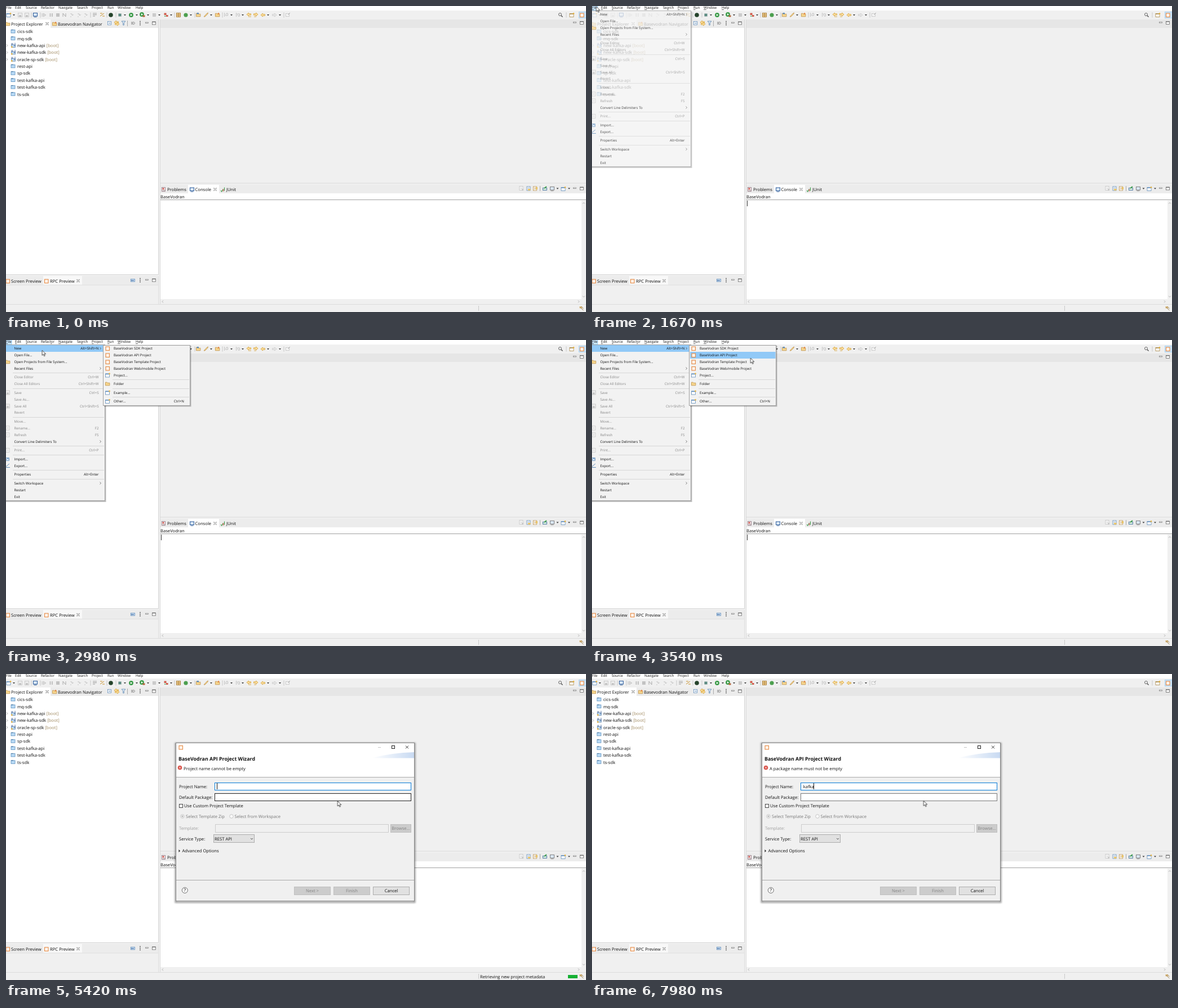
Animation, 1029 px wide and 544 px high, one loop 8000 ms. Source, as an HTML page:

```html
<!DOCTYPE html>
<html lang="en">
<head>
<meta charset="utf-8">
<title>Project wizard</title>
<style>
html, body { margin: 0; width: 100%; height: 100%; overflow: hidden; background: #f0f0f0; }
svg { display: block; width: 100vw; height: 100vh; }
text { font-family: "Open Sans", "Noto Sans", sans-serif; text-rendering: geometricPrecision; white-space: pre; }
.a { animation: 8s linear infinite; }
.s { animation: 8s step-end infinite; }
#pointer { animation-name: move; }
#arrow { animation-name: enter; }
#menu { animation-name: menu; }
#newRow { animation-name: newRow; }
#sub { animation-name: sub; }
#subRow { animation-name: subRow; }
#keys { animation-name: keys; }
#mark { animation-name: mark; }
#frame { animation-name: frame; }
#form { animation-name: form; }
#status { animation-name: status; }
#hover { animation-name: hover; }
#cover { animation-name: type; }
#caret { animation-name: blink; }
#errA { animation-name: errA; }
#errB { animation-name: errB; }

@keyframes enter { 0% { opacity: 0 } .875%, 100% { opacity: 1 } }
@keyframes move {
  0%, .875% { transform: translate(964px, 520px); animation-timing-function: ease-out }
  10%, 10.8% { transform: translate(20px, 2px) }
  13.875%, 24.5% { transform: translate(7.5px, .8px) }
  29.25%, 36.8% { transform: translate(38px, 15px) }
  41.125%, 42.5% { transform: translate(282px, 46px) }
  44.25% { transform: translate(281.3px, 32.3px) }
  45.375%, 48% { transform: translate(273px, 22px) }
  48.875%, 50% { transform: translate(281px, 28px) }
  50.75%, 57.5% { transform: translate(280.8px, 31px) }
  58.75%, 60% { transform: translate(283px, 39px); animation-timing-function: ease-in-out }
  67.4%, 70.75% { transform: translate(588.3px, 226px) }
  71.6%, 100% { transform: translate(588.2px, 225.4px) }
}
@keyframes menu {
  0%, 18% { opacity: 0 }
  21.75%, 50.75% { opacity: 1 }
  53%, 100% { opacity: 0 }
}
@keyframes keys { 0% { opacity: 0 } 18.75% { opacity: 1 } 51.8%, 100% { opacity: 0 } }
@keyframes newRow { 0% { opacity: 0 } 26.4%, 100% { opacity: 1 } }
@keyframes sub {
  0%, 31.5% { opacity: 0 }
  34.5%, 50.75% { opacity: 1 }
  53%, 100% { opacity: 0 }
}
@keyframes subRow {
  0% { opacity: 0; transform: none }
  39.25% { opacity: 1; transform: none }
  40.125% { opacity: 1; transform: translateY(12px) }
  41.125% { opacity: 1; transform: translateY(24px) }
  43.25% { opacity: 1; transform: translateY(12px) }
  44.25%, 100% { opacity: 1; transform: none }
}
@keyframes mark { 0% { opacity: 0 } 18.75% { opacity: 1 } 58.75%, 100% { opacity: 0 } }
@keyframes frame { 0%, 53% { opacity: 0 } 55.8%, 100% { opacity: 1 } }
@keyframes form { 0% { opacity: 0 } 60.625%, 100% { opacity: 1 } }
@keyframes status { 0% { opacity: 0 } 61.6% { opacity: 1 } 69.625%, 100% { opacity: 0 } }
@keyframes hover { 0% { stroke: #7a7a7a } 66% { stroke: #222 } 75.625%, 100% { stroke: #7a7a7a } }
@keyframes type {
  0% { transform: none }
  81.5% { transform: translateX(4px) }
  87.375% { transform: translateX(8px) }
  89.375% { transform: translateX(11px) }
  93.1% { transform: translateX(15px) }
  98.75%, 100% { transform: translateX(19px) }
}
@keyframes blink { 0% { opacity: 1 } 71.625% { opacity: 0 } 78.5%, 100% { opacity: 1 } }
@keyframes errA { 0% { opacity: 1 } 81.5%, 100% { opacity: 0 } }
@keyframes errB { 0% { opacity: 0 } 81.5%, 100% { opacity: 1 } }
</style>
</head>
<body>
<svg id="stage" viewBox="0 0 1029 544" preserveAspectRatio="none"></svg>
<script>
const BRAND = 'BaseVodran', UI = 7.65, SMALL = 6.15, ORANGE = '#e58a45', GREY = '#c2c2c2';

const rect = (x, y, w, h, fill, stroke, extra = '') =>
  `<rect x="${x}" y="${y}" width="${w}" height="${h}" fill="${fill}"${stroke ? ` stroke="${stroke}"` : ''} ${extra}/>`;
const path = (d, stroke, width = 1, fill = 'none') =>
  `<path d="${d}" stroke="${stroke}" stroke-width="${width}" fill="${fill}"/>`;
const disc = (x, y, r, fill, stroke = 'none') =>
  `<circle cx="${x}" cy="${y}" r="${r}" fill="${fill}" stroke="${stroke}" stroke-width=".8"/>`;
const text = (x, y, s, size = UI, fill = '#111', extra = '') =>
  `<text x="${x}" y="${y + size * .357}" font-size="${size}" fill="${fill}" ${extra}>${s}</text>`;
const group = (id, kind, body) => `<g id="${id}" class="${kind}">${body}</g>`;
const END = 'text-anchor="end"', MID = 'text-anchor="middle"', THIN = 'stroke-width=".8"';

// Small icons, placed by their centre
const square = (x, y) => rect(x - 3, y - 3, 6.5, 6.5, '#fdf3ea', ORANGE, 'stroke-width="1.1"');
const down = (x, y) => path(`M${x - 2} ${y - 1}h4l-2 2.2z`, 'none', 0, '#333');
const right = (x, y, c = '#555') => path(`M${x - 1} ${y - 2}l2 2l-2 2`, c, .8);
const cross = (x, y) => path(`M${x - 2.5} ${y - 2.5}l5 5m0-5l-5 5`, '#888', 1.6) + path(`M${x - 2} ${y - 2}l4 4m0-4l-4 4`, '#fff', .7);
const dots = (x, y) => `<path d="M${x} ${y - 4}v9" stroke="#999" stroke-dasharray="1 1.2"/>`;
const minMax = (x, y) => rect(x - 2.5, y - 1.5, 5, 1.6, '#fff', '#777', 'stroke-width=".7"') +
  rect(x + 9.5, y - 2.5, 6, 5, '#fff', '#666', THIN) + path(`M${x + 9.5} ${y - 2}h6`, '#666');
const kebab = (x, y) => [-3, 0, 3].map(d => disc(x, y + d, .9, '#555')).join('');
const folder = (x, y, c = '#f6d58c', e = '#bd914a') => path(`M${x - 3.6} ${y + 2.8}v-5.600h2.800l1 1.100h3.700v4.500z`, e, .8, c);
const win = (x, y, c = '#5f8cba') => rect(x - 4, y - 2.5, 7, 6, '#fff', c, THIN) +
  path(`M${x - 4} ${y - 2}h7`, c, 1.4) + disc(x + 3, y - 2.6, 1.3, '#e7b23c');
const disk = (x, y) => rect(x - 3.5, y - 3.5, 7, 7, '#eee', GREY, THIN) + rect(x - 1.8, y, 3.6, 3, GREY);
const page = (x, y, c = GREY) => rect(x - 3, y - 3.5, 6, 7, '#fafafa', c, THIN) + path(`M${x - 1.5} ${y - 1}h3m-3 2h3`, c, .7);
const screen = (x, y, c = '#39659f') => rect(x - 3.5, y - 3.5, 7, 5.5, '#dceafa', c, 'stroke-width="1.1"') + path(`M${x - 2.5} ${y + 3.6}h5`, c);
const play = (x, y) => disc(x, y, 3.9, '#3a9b48') + path(`M${x - 1.2} ${y - 2.1}l3.4 2.100l-3.400 2.100z`, 'none', 0, '#fff');
const arrow = (x, y, flip = 1, c = '#d49a22', f = '#ffe7b0') =>
  path(`M${x - 4 * flip} ${y}l${3.4 * flip}-2.800v1.600h${4 * flip}v2.400h${-4 * flip}v1.600z`, c, .8, f);
const step = (x, y) => path(`M${x - 3} ${y - 2}q3-2 4 2m-2-1l2 2l2-2M${x - 3} ${y + 3}h2`, GREY, .9);
const project = (x, y) => rect(x - 3.5, y - 2.5, 7, 5.5, '#b9daf5', '#5a8fbe', THIN) + path(`M${x - 3.5} ${y - 2.600}h4`, '#46749f', 1);
const bootProject = (x, y) => rect(x - 3.5, y - 1, 7, 4.5, '#c4dff5', '#5a7fa8', THIN) +
  path(`M${x - 3} ${y - 4}v3m2-3v3m4-3.400v4q0 1.600-2 1.300`, '#3a5c92', .9) + rect(x - 4, y + 1.6, 2.6, 2.6, '#e5b54a');

function toolbar() {
  const y = 16;
  const all = (f, ...xs) => xs.map(x => f(x, y)).join('');
  return win(5, y) + all(disk, 25, 37) + screen(52, y) +
    all(dots, 45, 61, 150, 179, 195, 299, 335, 384, 493, 994) +
    all(down, 14, 211, 232, 252, 272, 293, 328, 364, 400, 420, 465, 486) +
    path('M64 13v6M66 13l5 3l-5 3z', GREY, .9, '#ddd') +
    rect(77.5, 13, 2, 6, GREY) + rect(81, 13, 2, 6, GREY) + rect(89, 13, 6, 6, GREY) +
    path('M101 19v-6l5 6v-6', '#aaa', 1) + all(step, 117, 130, 142) +
    path('M154 13h7m-7 2.500h7m-7 2.500h4', '#888', .8) + path('M167 18l7-5m-7 0h4m0 5h4', '#c99128', 1) +
    disc(186, y, 3.8, '#25432b') +
    disc(202, y, 2.2, '#8fbcb3', '#2f6358') + path('M199 13.500l6 5m0-5l-6 5', '#2f6358', .6) +
    play(222, y) + play(241, y - 1) + rect(242.5, 16.5, 4, 3, '#b5623a') +
    rect(260.5, 13.5, 5, 5, '#ccc', GREY, THIN) +
    rect(280.5, 12.5, 4, 3.5, '#cf5a4a') + rect(284, 16, 3.5, 3, '#cf5a4a') + path('M281 18h2.500', '#3a9b48', 1.3) +
    rect(302.5, 12.5, 7, 7, '#efcf93', '#a0722a', THIN) + path('M306 12.500v7m-3.500-3.500h7', '#a0722a', .8) +
    disc(319, y, 3.6, '#4c9f4f') +
    folder(341, y) + rect(338.5, 12, 3.5, 2.5, '#5f8cba') + path('M351 19l5.500-6l2-1l-.8 2.500l-4.700 4.500z', '#bd914a', .8, '#f6d58c') +
    folder(375, y) + disc(377, 13.5, 1.5, ORANGE) +
    path('M387.500 12v7m2-2h4v-4h-2.500z', GREY, 1) + path('M408.500 12v7m2-5h4v4h-2.500z', GREY, 1) +
    arrow(431, 15) + arrow(443, 15, -1) + path('M430 19h5m5 0h4', '#d49a22', .8) +
    arrow(456, y) + arrow(476, y, -1, GREY, '#eee') +
    rect(496.5, 13.5, 6, 5, '#f7f7f7', GREY, THIN) + path('M500 16l4-4', '#999', .8) +
    disc(983, 15, 2.5, 'none', '#444') + path('M985 17l2.500 2.500', '#444', 1.2) +
    win(1004, y, '#a88746') + rect(1016.5, 10.5, 13, 11, '#cce4f7', '#a9d2f2') + square(1021.5, y);
}

function base() {
  const menus = { File: 0, Edit: 16, Source: 35, Refactor: 62, Navigate: 93, Search: 126, Project: 152, Run: 180, Window: 198, Help: 230 };
  const tree = ['cics-sdk', 'mq-sdk', '*new-kafka-api', '*new-kafka-sdk', '*oracle-sp-sdk', 'rest-api', 'sp-sdk', 'test-kafka-api', 'test-kafka-sdk', 'ts-sdk'];
  let out = rect(0, 0, 1029, 544, '#f0f0f0') + rect(0, 0, 1029, 8, '#fff') +
    group('keys', 's', rect(-1, -1, 11, 9, '#cce8ff', '#99d1ff') +
      path('M0 6.500h3M16 6.500h3M35 6.500h3M79 6.500h2.500M93 6.500h4.500M133 6.500h3M152 6.500h3.500M180 6.500h3.500M198 6.500h5M230 6.500h4', '#333', .7));
  for (const [s, x] of Object.entries(menus)) out += text(x, 3, s, SMALL);
  out += toolbar();

  // Explorer pane
  out += rect(0, 24, 271, 15, '#ececec') + rect(0, 24, 79, 15, '#fff') + rect(0, 39, 270, 438, '#fff') +
    path('M270.500 24v454M0 477.500h271', '#d5d5d5') +
    folder(3, 32) + text(9, 32, 'Project Explorer') + cross(73, 31.5) +
    folder(86, 32) + disc(88, 29.5, 1.5, ORANGE) + text(92, 32, 'Basevodran Navigator') +
    rect(180.5, 27.5, 6, 6, '#fff', '#5f8cba', THIN) + path('M182 30.500h3.500', '#5f8cba') +
    arrow(196, 29, 1) + arrow(197, 32, -1) + path('M205 27h7l-2.700 3v4h-1.600v-4z', '#5580ad', .8, '#e4effa') +
    path('M215.500 26v10', '#aaa') + rect(222, 28, 4, 5, '#b5b5b5') + path('M226 28l3 2.500l-3 2.500', '#888') +
    kebab(238, 30.5) + minMax(250, 30.5);
  tree.forEach((name, i) => {
    const y = 45.5 + 12.37 * i, boot = name[0] === '*';
    const label = boot ? `${name.slice(1)} <tspan fill="#a08a60">[boot]</tspan>` : name;
    out += (boot ? right(2, y, '#999') + bootProject(13, y - .3) : project(12.5, y - .5)) + text(20, y, label);
  });

  // Preview pane
  out += rect(0, 480, 271, 16, '#ececec') + rect(66, 480, 69, 16, '#f8f8f8') + path('M270.500 480v50M0 496h270', '#dedede') +
    square(3, 489) + text(9, 489, 'Screen Preview') + square(71.5, 489) + text(78, 489, 'RPC Preview') + cross(128, 488.5) +
    rect(221.5, 485.5, 7, 4.5, '#d5e7f7', '#5f8cba', THIN) + path('M222 488h5', '#39659f', 1.2) +
    kebab(238, 487.5) + minMax(250, 487.5);

  // Editor area and console
  out += rect(274, 24, 755, 15, '#e6e6e6') + path('M273.500 24v506M274 315h755', '#d9d9d9') + minMax(1009, 30) +
    rect(274, 318, 755, 15, '#ececec') + rect(323, 318, 55, 15, '#fff') + rect(274, 333, 755, 188, '#fff') +
    rect(276.5, 322.5, 6, 7, '#f6e6e6', '#8e7480', THIN) + disc(279, 325, 1.4, '#cc4b43') + path('M278 328h4', '#888', .8) +
    text(286, 326.5, 'Problems') + screen(330, 326.5) + text(335.5, 326.5, 'Console') + cross(371, 326) +
    path('M381 328l1.600 2l2.600-4.500M387.500 322.500v6', '#3a9b48', 1.1) + rect(384.5, 325.5, 2, 4, '#c8776a') + text(391, 326.5, 'JUnit') +
    page(914, 324) + path('M915 325l3 3m0-3l-3 3', '#aaa', .8) +
    page(927, 324.5, '#5f8cba') + rect(926, 325, 4.5, 3, '#e9c468') + page(938.5, 324.5, '#bd914a') + rect(940, 322, 3, 4, '#e9c468') +
    path('M947.500 320v9', '#aaa') + rect(952.5, 323.5, 7, 4, '#d3ecdb', '#39659f', THIN) + path('M955 324l4-3', '#3a9b48', 1.8) +
    screen(969, 325, '#888') + down(978.5, 324.5) + win(989, 325) + down(999, 324.5) + minMax(1009, 324.5) +
    text(274, 339.5, BRAND) + path('M274 344.500h755', '#a0a0a0') +
    rect(1021, 346, 8, 175, '#f0f0f0') + rect(274, 521, 755, 9, '#f0f0f0') +
    path('M1023 351.500l2-2l2 2M1023 515.500l2 2l2-2M279 523.500l-2 2l2 2M1015 523.500l2 2l-2 2', '#aaa', .9) +
    path('M0 530.500h1029', '#dcdcdc') + dots(838.5, 537.5) +
    rect(1017.5, 534, 4.5, 3.5, '#dfbd80') + path('M1018 535l6.500 6m-4-7l4 4', '#9a8050', 1) +
    group('mark', 's', path('M275.500 346v10', '#333')) +
    group('status', 's', text(841, 538, 'Retrieving new project metadata') + rect(997, 535, 17, 6, '#16b034'));
  return out;
}

function menuItems(list, x, end) {
  return list.map(([y, s, key = '', off]) => {
    const c = off ? '#858585' : '#111';
    return text(x, y, s, SMALL, c) + (key === '>' ? right(end + 3, y) : text(end, y, key, SMALL, c, END));
  }).join('');
}

function fileMenu() {
  const items = [
    [15, 'New', 'Alt+Shift+N'], [27, 'Open File...'], [39, 'Open Projects from File System...'], [50.5, 'Recent Files', '>'],
    [66, 'Close Editor', 'Ctrl+W', 1], [78, 'Close All Editors', 'Ctrl+Shift+W', 1],
    [93.5, 'Save', 'Ctrl+S', 1], [105.5, 'Save As...', '', 1], [117.5, 'Save All', 'Ctrl+Shift+S', 1], [129, 'Revert', '', 1],
    [144.5, 'Move...', '', 1], [156.5, 'Rename...', 'F2', 1], [168.5, 'Refresh', 'F5', 1], [180.5, 'Convert Line Delimiters To', '>'],
    [196, 'Print...', 'Ctrl+P', 1], [211.5, 'Import...'], [223.5, 'Export...'], [239, 'Properties', 'Alt+Enter'],
    [254.5, 'Switch Workspace', '>'], [266.5, 'Restart'], [278.5, 'Exit']];
  const lines = [58.5, 86.5, 137.5, 188.5, 204.5, 231.5, 247.5];
  return rect(-2, 10, 179.5, 278, '#000', '', 'opacity=".25"') + rect(-2, 8.5, 177.5, 277, '#f2f2f2', '#a0a0a0') +
    group('newRow', 's', rect(0, 9, 173, 12, '#91c9f7')) +
    path(lines.map(y => `M12 ${y}h162`).join(''), '#d7d7d7') + menuItems(items, 14.5, 164.5) + right(167.5, 15) +
    folder(3, 39) + disk(3, 93.5) + disk(3, 117.5) + page(3, 156.5) + page(3, 168.5) + page(3, 196) +
    rect(-.5, 209.5, 6, 5, '#d7e7f7', '#5f8cba', THIN) + path('M0 213l3-3l3 3M0 225l6-5M0 226.500h7', '#5f8cba');
}

function newMenu() {
  const items = [[15, BRAND + ' SDK Project'], [27, BRAND + ' API Project'], [39, BRAND + ' Template Project'],
    [50.5, BRAND + ' Web/mobile Project'], [62.5, 'Project...'], [78, 'Folder'], [93.5, 'Example...'], [109, 'Other...', 'Ctrl+N']];
  return rect(174, 10, 154.5, 108.5, '#000', '', 'opacity=".25"') + rect(172.5, 9.5, 154, 107, '#f2f2f2', '#a0a0a0') +
    group('subRow', 's', rect(174, 21, 151.5, 12, '#91c9f7')) +
    path('M189 70.500h136M189 86.500h136M189 101.500h136', '#d7d7d7') + menuItems(items, 191, 316) +
    [15, 27, 39, 50.5].map(y => square(180, y)).join('') + [62.5, 93.5, 109].map(y => win(180.5, y)).join('') + folder(180, 78);
}

function dialog() {
  const button = (x, y, w, s, off) => rect(x + .5, y + .5, w - 1, 14, off ? '#ccc' : '#e1e1e1', off ? '#bfbfbf' : '#adadad') +
    text(x + w / 2, y + 7.5, s, UI, off ? '#838383' : '#111', MID);
  const shadow = `<path d="M290 110h446v306h-446zM302 123v280h422v-280z" fill-rule="evenodd" clip-path="url(#rim)"/>`;
  const frame = rect(301, 123.5, 424, 282, 'none', '#000', 'stroke-width="3" filter="url(#soft)" opacity=".4" clip-path="url(#rim)"') +
    rect(302, 123, 422, 16, '#fff') + rect(301.5, 122.5, 423, 281, 'none', '#b0b0b0') + square(310, 130.5);
  const form = rect(302, 139, 422, 264, '#f0f0f0') + rect(302, 139, 422, 44, '#fff') +
    path('M648 149.500Q684 140 724 139v10.500z', 'none', 0, 'url(#sweep)') +
    path('M302 183.500h422M302 366.500h422', '#a9a9a9') +
    path('M660 130.500h5', '#c4c4c4') + rect(684.5, 127.5, 5, 5, 'none', '#222') + path('M709 127.500l5 5m0-5l-5 5', '#222', .9) +
    text(306, 150.5, BRAND + ' API Project Wizard', 8.9, '#111', 'font-weight="700"') +
    disc(308.5, 166.5, 3.8, '#d9534a') + path('M307 165l3 3m0-3l-3 3', '#fff', .9) +
    group('errA', 's', text(315, 168, 'Project name cannot be empty', 7.7)) +
    group('errB', 's', text(315, 168, 'A package name must not be empty', 7.7)) +
    text(307, 200, 'Project Name:') + rect(370.5, 193.5, 348, 13, '#fff', '#0078d7') + text(374.7, 200, 'kafka') +
    group('cover', 's', rect(374.5, 194, 26, 12, '#fff') + group('caret', 's', path('M374.500 194v11', '#111'))) +
    text(307, 219.5, 'Default Package:') + rect(370.5, 212.5, 348, 13, '#fff', '#7a7a7a', 'id="hover" class="s"') +
    rect(307.5, 231.5, 6, 6, '#fff', '#333', 'stroke-width=".9"') + text(316, 234.5, 'Use Custom Project Template') +
    disc(313, 253, 3.3, '#f8f8f8', '#bbb') + disc(313, 253, 1.7, '#bbb') + text(319, 253.5, 'Select Template Zip', UI, '#777') +
    disc(400, 253, 3.3, '#f8f8f8', '#bbb') + text(405.5, 253.5, 'Select from Workspace', UI, '#777') +
    text(307, 274.5, 'Template:', UI, '#a0a0a0') + rect(371.5, 267.5, 307, 14, '#f0f0f0', '#ccc') + button(682, 267, 37, 'Browse...', 1) +
    text(307, 293, 'Service Type:') + rect(368.5, 285.5, 72, 14, '#e1e1e1', '#adadad') + text(370, 293, 'REST API') +
    path('M434 292l2 2l2-2', '#444', .9) + path('M306.500 312l2.500 2.500l-2.500 2.500z', 'none', 0, '#222') + text(312.5, 314, 'Advanced Options') +
    disc(317.3, 384.5, 5, '#fff', '#444') + text(317.3, 384.5, '?', 8, '#333', MID + ' font-weight="600"') +
    button(511, 378, 65, 'Next &gt;', 1) + button(581, 378, 65, 'Finish', 1) + button(651, 378, 65, 'Cancel') +
    rect(301.5, 122.5, 423, 281, 'none', '#858585');
  return group('frame', 'a', frame) + group('form', 's', form);
}

const defs = `<defs><filter id="soft" x="-5%" y="-5%" width="110%" height="110%"><feGaussianBlur stdDeviation="1.8"/></filter>
<clipPath id="rim"><path d="M290 110h446v306h-446zM302 123v280h422v-280z" clip-rule="evenodd"/></clipPath>
<linearGradient id="sweep"><stop offset="0" stop-color="#fff"/><stop offset="1" stop-color="#c8daf2"/></linearGradient></defs>`;
const pointer = group('pointer', 'a', group('arrow', 's', path('M0 0v9l2.100-2l1.500 3.300l1.500-.7l-1.500-3.200h2.900z', '#222', .8, '#fff')));

document.getElementById('stage').innerHTML =
  defs + base() + group('menu', 'a', fileMenu()) + group('sub', 'a', newMenu()) + dialog().replace(/\s+\/>/g, '/>') + pointer;
</script>
</body>
</html>
```
